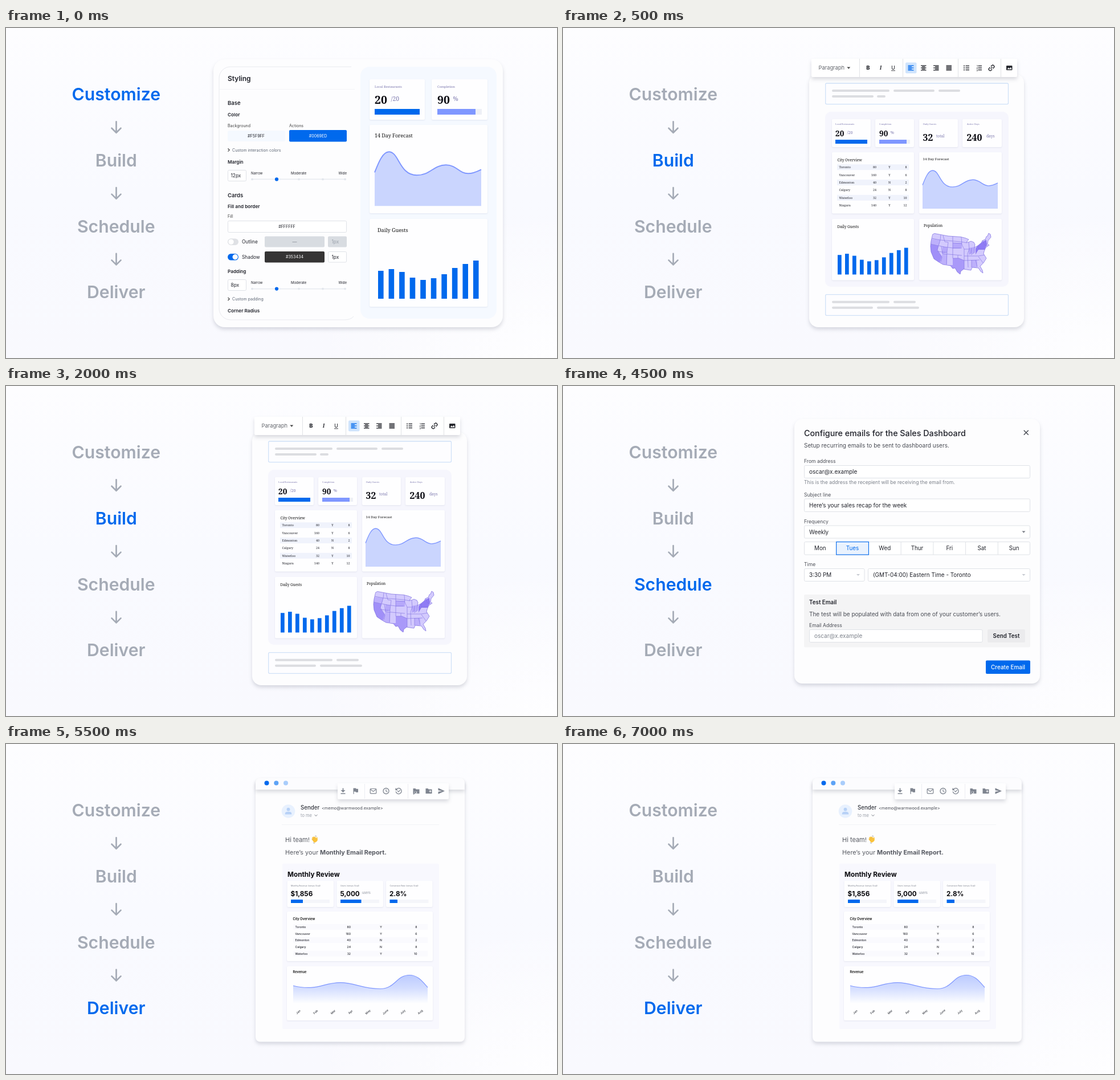
An HTML page for the animation above (8 s loop, 967 by 579 pixels).

```html
<!DOCTYPE html>
<html lang="en">
<head>
<meta charset="utf-8">
<title>Report workflow</title>
<style>
  html, body { margin: 0; width: 100%; height: 100%; overflow: hidden; background: #fbfbff; }
  svg { display: block; width: 967px; height: 579px; font-family: Inter, sans-serif; font-optical-sizing: none; }
  .serif { font-family: "Noto Serif", serif; }
  .card { filter: drop-shadow(0 4px 3px rgba(40, 45, 70, .16)); }
  .tile { filter: drop-shadow(0 1px 1px rgba(60, 70, 120, .1)); }
</style>
</head>
<body>
<svg id="stage" viewBox="0 0 967 579" xmlns="http://www.w3.org/2000/svg"></svg>
<script>
const BLUE = '#0069ed', SOFT = '#7f97ff', INK = '#20222a', GREY = '#a5abb6';
const LOOP = 8000, CUTS = [0, 500, 3000, 5500];

// Drawing helpers, each returns SVG markup
const rect = (x, y, x2, y2, fill, r = 0, more = '') =>
  `<rect x="${x}" y="${y}" width="${x2 - x}" height="${y2 - y}" rx="${r}" fill="${fill}" ${more}/>`;
const text = (x, y, s, size, fill = INK, weight = 400, anchor = 'start', more = '') =>
  `<text x="${x}" y="${y}" font-size="${size}" fill="${fill}" font-weight="${weight}" text-anchor="${anchor}" ${more}>${s}</text>`;
const mid = (x, y, s, size, fill, weight) => text(x, y, s, size, fill, weight, 'middle');
const end = (x, y, s, size, fill, weight) => text(x, y, s, size, fill, weight, 'end');
const line = (d, color, w = 1, more = '') =>
  `<path d="${d}" fill="none" stroke="${color}" stroke-width="${w}" ${more}/>`;
const shape = (d, fill, more = '') => `<path d="${d}" fill="${fill}" ${more}/>`;
const dot = (x, y, r, fill, more = '') => `<circle cx="${x}" cy="${y}" r="${r}" fill="${fill}" ${more}/>`;
const group = (more, ...parts) => `<g ${more}>${parts.join('')}</g>`;
const field = (x, y, x2, y2) => rect(x + .5, y + .5, x2 - .5, y2 - .5, '#fff', 2, 'stroke="#dfe2e7"');
const tile = (x, y, x2, y2) => rect(x, y, x2, y2, '#fefeff', 2, 'class="tile"');
const card = (x, y, x2, y2, r) => rect(x, y, x2, y2, '#fdfdfe', r, 'class="card"');
const caret = (x, y, c) => shape(`M${x - 3},${y - 1.5}h6l-3,3.2z`, c);
const round = 'stroke-linecap="round" stroke-linejoin="round"';

function forecast(x, y, s) {
  const top = 'M0,36C5,24 13,0 25,0C43,0 43,41 74,41C98,41 103,23 125,23C144,23 148,38 164,38C173,38 181,34 187,31';
  return group(`transform="translate(${x} ${y}) scale(${s})"`,
    shape(top + 'V95H0Z', '#cad5fe'), line(top, SOFT, 1.9));
}
function bars(x, y, s) {
  const heights = [49, 52, 47, 37, 33, 36, 43, 54, 61, 67];
  return heights.map((h, i) => {
    const left = x + i * 18.55 * s;
    return rect(left, y - h * s, left + 9.6 * s, y, BLUE);
  }).join('');
}

const cities = [['Toronto', 80, 'Y', 8], ['Vancouver', 160, 'Y', 6], ['Edmonton', 40, 'N', 2],
  ['Calgary', 24, 'N', 8], ['Waterloo', 32, 'Y', 10], ['Niagara', 140, 'Y', 12]];
function table(rows, y, step, cols, stripe, size, weight) {
  return rows.map(([city, count, flag, rank], i) => {
    const by = y + i * step;
    return (i % 2 ? '' : rect(stripe[0], by - 7, stripe[1], by + 3, stripe[2])) +
      text(cols[0], by, city, size, INK, weight) + end(cols[1], by, count, size, INK, weight) +
      mid(cols[2], by, flag, size, INK, weight) + end(cols[3], by, rank, size, INK, weight);
  }).join('');
}

// Scene 1: styling panel
function slider(y) {
  return text(430, y - 8.5, 'Narrow', 5.9) + text(500, y - 8.5, 'Moderate', 6) + end(598, y - 8.5, 'Wide', 6) +
    line(`M431,${y}H597`, '#e9ecf1', 1.8) +
    [432, 514, 556, 595].map(x => dot(x, y, 1.9, '#e2e6ec')).join('') + dot(475, y, 3.1, BLUE);
}
const more = (y, s) => line(`M389.5,${y - 5}l2.7,2.6l-2.7,2.6`, '#333', 1.1) + text(397, y, s, 7.05, '#5d6674');
const head = (y, s, size = 8.2) => text(389, y, s, size, INK, 600);
function stat(x, y, s, label, value, unit, gap) {
  return text(x, y, label, 5.65 * s, '#7c78ae') + text(x, y + 28 * s, value, 19.5 * s, '#0b0b12', 600) +
    text(x + gap, y + 22.5 * s, unit, 10.2 * s, '#7c78ae');
}
function styling() {
  return [
    card(364, 55, 872, 525, 20),
    line('M606,68H394a20,20 0 0 0 -20,20V492a20,20 0 0 0 20,20H594q11,0 16,-6', '#e9eaef'),
    line('M375,107.5H612', '#f3f4f7'),
    head(92.5, 'Styling', 12), head(135, 'Base', 9.5), head(154.5, 'Color'),
    text(389, 174, 'Background', 7.05, '#444'), text(497, 174, 'Actions', 7.05, '#444'),
    rect(389, 180, 490, 199, '#f5f9ff', 2), mid(439, 191.6, '#F5F9FF', 7.1),
    rect(497, 179, 598, 199.5, BLUE, 2), mid(547.5, 191.6, '#0069ED', 7.1, '#fff'),
    more(216.5, 'Custom interaction colors'),
    head(237.5, 'Margin'), field(389, 249, 422, 269), text(394.5, 262, '12px', 8.3), slider(265.4),
    head(296.6, 'Cards', 9.5), head(315.8, 'Fill and border'), text(389, 332.6, 'Fill', 7.05, '#444'),
    field(389, 338, 598, 359), mid(493, 350.8, '#FFFFFF', 7.1),
    rect(389, 369.5, 408, 381, '#dfe1e5', 5.8), dot(395, 375.2, 5.2, '#fff', 'stroke="#d5d7db" stroke-width=".7"'),
    text(414, 378.2, 'Outline', 8.3), rect(454, 365.5, 559, 384.5, '#d8dce1', 2), mid(506.5, 377.5, '—', 8, '#777e88'),
    rect(565, 365.5, 598, 384.5, '#d8dce1', 2), text(571.5, 378.2, '1px', 8.3, '#9aa1ab'),
    rect(389, 396, 408, 407.6, BLUE, 5.8), dot(402.2, 401.8, 4.7, '#fff'),
    text(414, 405, 'Shadow', 8.3), rect(454, 392, 559, 411.5, '#353434', 2), mid(506.5, 404.3, '#353434', 7.1, '#fff'),
    field(565, 392, 598, 411.5), text(571.5, 405, '1px', 8.3),
    head(430, 'Padding'), field(389, 441, 422, 461), text(394.5, 454.3, '8px', 8.3), slider(457.6),
    more(477.8, 'Custom padding'), head(498.5, 'Corner Radius'),
    rect(622, 68, 861, 510, '#f5f9ff', 16),
    tile(638, 90, 735, 161), tile(747, 90, 845, 161), tile(638, 170, 845, 325), tile(638, 335, 845, 489),
    group('class="serif"',
      stat(647, 105, 1, 'Local Restaurants', 20, '/20', 28.5), stat(757, 105, 1, 'Completion', 90, '%', 27.5),
      text(647, 191.5, '14 Day Forecast', 8.95, '#111'), text(652, 358, 'Daily Guests', 9.1, '#111')),
    rect(647, 142, 726, 152, BLUE), rect(757, 142, 835, 152, '#eef0f6'), rect(757, 142, 824, 152, SOFT),
    forecast(647, 217.3, 1), bars(653, 475, 1)
  ].join('');
}

// Scene 2: report builder
const rows = (x, y, w) => [0, 1, 2, 3, 4].map(i =>
  line(`M${x},${y - 4 + i * 2}h${w[i % w.length]}`, '#26282e', 1.3)).join('');
function toolbar() {
  const ink = '#26282e';
  const list = x => [-3.5, 0, 3.5].map(d => line(`M${x - 1.5},${70 + d}h6.5`, ink, 1.4)).join('');
  return [
    rect(436, 54, 797, 86, '#fff', 2, 'class="card"'),
    text(448.5, 73.2, 'Paragraph', 9.3, '#63666d'), caret(501.3, 70, '#444'),
    [520, 596, 693, 768].map(x => line(`M${x}.5,54V86`, '#e1e2e6')).join(''),
    mid(535.5, 73.4, 'B', 9.5, ink, 800),
    text(557.5, 73.4, 'I', 9.5, ink, 600, 'middle', 'font-family="Liberation Serif, serif" font-style="italic"'),
    mid(579.5, 72.8, 'U', 8.6, ink, 500), line('M576,74.8h7', ink, .9),
    rect(601, 60.5, 620.5, 79.5, '#cfe4fc', 2),
    group('', rows(605.5, 70, [10, 6.5]).replaceAll(ink, BLUE)),
    [-4, -2, 0, 2, 4].map((d, i) => line(`M${i % 2 ? 630 : 628},${70 + d}h${i % 2 ? 5.5 : 9.5}`, ink, 1.3)).join(''),
    [-4, -2, 0, 2, 4].map((d, i) => line(`M659.5,${70 + d}h${i % 2 ? -6.5 : -9.5}`, ink, 1.3)).join(''),
    rows(672.5, 70, [9.5]),
    list(708), [-3.5, 0, 3.5].map(d => dot(704, 70 + d, 1, ink)).join(''),
    list(730), [1, 2, 3].map(n => mid(726.7, 64.7 + n * 3.6, n, 3.8, ink, 600)).join(''),
    group('transform="rotate(-45 752 70)"', line('M751,67.5h-2.2a2.5,2.5 0 0 0 0,5h2.2M753,67.5h2.2a2.5,2.5 0 0 1 0,5h-2.2M750,70h4', ink, 1.4)),
    rect(778, 66, 788.5, 74, ink, 1), shape('M779.5,72.6l2.4,-3.2l1.8,2l2,-2.6l2,3.8z', '#fff')
  ].join('');
}
const draft = (y, segs) => segs.map(([x, x2]) => line(`M${x + 2},${y}H${x2 - 2}`, '#dcdde1', 4, round)).join('');
const block = (y, a, b) =>
  rect(460.7, y, 781.5, y + 36.6, '#fdfdff', 2, 'stroke="#d0e1f8" stroke-width="1.3"') + draft(y + 13, a) + draft(y + 23, b);

function map() {
  const land = 'M649,362L652,360.5L676,365L698,366.5L706,368.5L712,371L708,376L711,376L716,374L721,376L723,380L722,385L728,382' +
    'L734,377L736,373L741,371L743,366L745,365L747,360L750,362L751,367L746,373L745,379L748,381L742,385L739,392L738,396L743,404' +
    'L738,412L732,418L736,425L737,430L733,427L729,421L718,420L716,425L709,424L703,423L698,427L697,432L692,428L688,421' +
    'L684,422L680,417L667,415L660,411L651,405L646,393L645,383L646,374Z';
  const borders = 'M647,369L662,372L698,375L709,377M645,379L669,384L684,386L698,386M663,363L662,372L659,382L657,389L665,402L663,410' +
    'M667,364L670,375L676,376M676,376L674,392M684,366L684,404M664,383L666,396L700,399M674,392L673,415M657,392L674,394' +
    'M684,377L700,378M699,367L700,380L704,388L704,408M684,404L695,404L704,408L704,423M693,399V404M704,388L713,388' +
    'M704,400L729,400L741,398M704,408L731,407M712,376L713,388L710,396L711,420M717,386L716,396M722,385L722,394L716,398' +
    'M717,407V420M724,407L727,419M729,382V388L724,397M729,388L740,388M736,373L740,381L745,382M741,371L743,380M729,401L737,412';
  return group('clip-path="url(#land)"',
      shape(land, '#d3cafd'),
      shape('M640,378L659,382L657,390L666,403L663,411L640,411Z', '#a08ff8'),
      shape('M684,404H695L704,408V424L697,436L684,424L676,416H684Z', '#a999f9'),
      shape('M666,383L674,385V394L665,396ZM684,377H700V387H684ZM712,386L723,384L722,394L712,398Z', '#b6a8fa'),
      shape('M724,387L728,381L738,374L743,372L744,380L740,389H729L724,396Z', '#8f7cf5'),
      shape('M645,370L662,372L660,381L645,379ZM666,396H674V415H660ZM717,407H727V420H717Z', '#bdb0fb'),
      line(borders, '#8274e2', .65)) +
    line(land, '#8274e2', .8, round) + `<clipPath id="land"><path d="${land}"/></clipPath>`;
}
function builder() {
  const tops = [[472, 540], [548, 616], [625, 693], [701, 770]];
  const big = (x, label, value, unit, gap) => text(x, 170, label, 3.95, '#7c78ae') +
    text(x - .5, 197.5, value, 16, '#0b0b12', 600) + text(x + gap, 191.5, unit, 6.7, '#7c78ae');
  return [
    card(432, 80, 809, 525, 16), toolbar(),
    block(97, [[472, 573], [580, 652], [659, 697]], [[472, 545], [551, 566]]),
    rect(460, 147, 782, 454, '#f6f6fd', 10),
    tops.map(([a, b]) => tile(a, 160, b, 209)).join(''),
    [218, 335].map(y => tile(472, y, 616, y + 107.5) + tile(625, y, 770, y + 107.5)).join(''),
    rect(478, 196, 534, 203, BLUE), rect(555, 196, 609, 203, '#eef0f6'), rect(555, 196, 603, 203, SOFT),
    group('class="serif"',
      stat(478, 170, .7, 'Local Restaurants', 20, '/20', 20.5), stat(555, 170, .7, 'Completion', 90, '%', 19.5),
      big(632, 'Daily Guests', 32, 'total', 23), big(709, 'Active Days', 240, 'days', 34),
      text(481.5, 233.5, 'City Overview', 6.45, '#111', 500), text(631.5, 232.2, '14 Day Forecast', 6.15, '#111', 500),
      text(481.5, 351, 'Daily Guests', 6.4, '#111', 500), text(633, 349, 'Population', 6.4, '#111', 500),
      table(cities, 246.2, 13.4, [484.5, 550, 573, 603.5], [481, 607, '#f0f3fc'], 5.4, 500)),
    forecast(631, 250, .706), bars(482, 432.5, .7), map(),
    block(467.7, [[472, 573], [580, 619]], [[472, 544], [551, 625]])
  ].join('');
}

// Scene 3: email schedule
function schedule() {
  const days = ['Mon', 'Tues', 'Wed', 'Thur', 'Fri', 'Sat', 'Sun'], w = 56.72;
  const label = (x, y, s) => text(x, y, s, 8.6, '#4a4d55');
  const mail = 'oscar@x.example';
  return [
    card(406, 58, 837, 522, 14),
    text(423, 88, 'Configure emails for the Sales Dashboard', 14.3, INK, 500),
    line('M808.8,77.8l8,8m0,-8l-8,8', '#4a4d55', 1.5),
    text(423, 107.5, 'Setup recurring emails to be sent to dashboard users.', 10.05, '#4a4d55'),
    label(423, 135.4, 'From address'), field(423, 139, 820, 162), text(432, 154.2, mail, 10),
    text(423, 172, 'This is the address the recepient will be receiving the email from.', 8.63, '#7d828b'),
    label(423, 194, 'Subject line'), field(423, 197.5, 820, 221),
    text(432, 213, 'Here’s your sales recap for the week', 9.95),
    label(423, 240.6, 'Frequency'), field(423, 244.5, 820, 267.5), text(432, 259.6, 'Weekly', 9.9), caret(808.5, 256, '#777b84'),
    field(423, 273, 820, 296.5),
    days.map((d, i) => (i ? line(`M${423 + i * w},273.5V296`, '#dfe2e7') : '') +
      (i === 1 ? '' : mid(423 + (i + .5) * w, 288.4, d, 9.8))).join(''),
    rect(479.7, 273.5, 536.4, 296, '#e9f2fe', 0, `stroke="${BLUE}" stroke-width="1.1"`), mid(508, 288.4, 'Tues', 9.8, BLUE),
    label(423, 316, 'Time'), field(423, 320, 529.5, 343), text(432, 335, '3:30 PM', 9.9), caret(518, 331.4, '#c5c9d0'),
    field(535, 320, 820, 343), text(544, 335, '(GMT-04:00) Eastern Time - Toronto', 9.9), caret(808.5, 331.4, '#c5c9d0'),
    rect(423, 366, 820, 458.5, '#f4f4f5', 2), text(432, 383, 'Test Email', 9.8, INK, 600),
    text(432, 403.8, 'The test will be populated with data from one of your customer’s users.', 10, '#4a4d55'),
    label(432, 422.8, 'Email Address'), field(432, 427, 736.5, 450), text(441, 442, mail, 10, '#7d828b'),
    rect(745, 427, 811, 450, '#ebebed', 2), mid(778, 442, 'Send Test', 9.75, INK, 600),
    rect(742, 481.5, 820, 505, BLUE, 2), mid(781, 496.8, 'Create Email', 10, '#fff', 500)
  ].join('');
}

// Scene 4: delivered mail
function mailIcons() {
  const c = '#7f8590';
  const folder = x => shape(`M${x - 5.5},78h4l1.2,1.5h5.8v7.5h-11z`, c);
  return [
    rect(582, 69, 777, 97, '#fefeff', 2, 'class="card"'),
    [629, 705].map(x => line(`M${x}.5,70V96`, '#eceef2')).join(''),
    line('M591.5,77.5v5M587.5,87h8', c, 1.7), shape('M587.5,81h8l-4,4z', c),
    shape('M609.5,77.5h4.5l.7,1.2h3.3v6h-4l-.7,-1.2h-2.6v4.2h-1.2z', c),
    rect(639.2, 78.5, 649.8, 86.8, 'none', 1, `stroke="${c}" stroke-width="1.2"`), line('M639.5,79.5l5,3.7l5,-3.7', c, 1.2),
    dot(667, 82.5, 5, 'none', `stroke="${c}" stroke-width="1.3"`), line('M667,79.5v3.2l2.4,1.6', c, 1.2),
    line('M684.8,80a5,5 0 1 1 -.6,3.4M684,77.5v3h3', c, 1.3), line('M687,82.3l1.8,1.7l3.2,-3.3', c, 1.2),
    folder(720), line('M716,88.5l4,-4m-3.5,0h3.5v3.5', '#fff', 2.2), line('M715,88.5l4.5,-4.5m-3,0h3v3', c, 1.2),
    folder(742), line('M744.5,81v4m-2,-2h4', '#fff', 1),
    shape('M758.5,77.3l11.5,5.2l-11.5,5.2v-4l7,-1.2l-7,-1.2z', c)
  ].join('');
}
function wave() {
  const skin = '#f9c23c';
  return group('transform="translate(541.5 167.5) rotate(-35)"',
    [-2.9, -1, .9, 2.8].map((x, i) => line(`M${x},1V${[-3, -4.6, -4.4, -3][i]}`, skin, 1.9, round)).join(''),
    rect(-3.8, -1, 3.8, 5, skin, 2.6), line('M3.2,3L5.2,-.2', skin, 1.9, round),
    line('M-1.9,-1V-3.2M0,-1V-3.6M1.9,-1V-3.2', '#d99a25', .4),
    line('M4.2,-4.6q1.6,.8 1.9,2.4M-5.2,3q.2,1.8 1.6,2.8', '#8d939e', .8));
}
function deliver() {
  const top = 'M504,424C514,427 524,427.7 535,427.4C555,426 565,418.6 587,418.6C612,418.6 625,429.5 657,429.5C683,429.5 685,405.5 708,405.5C723,405.5 731,417 740,427';
  const months = ['Jan', 'Feb', 'Mar', 'Apr', 'May', 'June', 'July', 'Aug'];
  const kpi = (x, name, value, w) => tile(x - 6.5, 240, x + 75, 286) + text(x, 250, `${name} (versus Goal)`, 3.5, '#777c88') +
    text(x - .5, 266.5, value, 11.7, '#08080c', 700) + rect(x, 273, x + 68, 279, '#f5f6fa') + rect(x, 273, x + w, 279, BLUE, .6);
  return [
    card(438, 60, 805, 522.5, 8),
    shape('M438,80V68a8,8 0 0 1 8,-8H797a8,8 0 0 1 8,8V80Z', '#fcfcfe', 'class="card"'),
    dot(457.5, 68.5, 4, BLUE), dot(474.3, 68.5, 4, '#5da3f6'), dot(491, 68.5, 4, '#a9cdfb'),
    mailIcons(),
    dot(495.5, 118, 11.8, '#e8f1fe'), dot(495.5, 114.7, 2.9, '#b7d1f6'), shape('M489.8,123.6v-1.6q0,-3.2 5.7,-3.2t5.7,3.2v1.6z', '#b7d1f6'),
    text(517, 115.4, 'Sender', 9.7, '#33363e', 500), text(554, 114.6, '&lt;memo@warmwood.example&gt;', 7.3, '#4a4d55'),
    text(517, 127.7, 'to me', 7.5, '#9a9fa9'), line('M541.5,124l2.5,2.4l2.5,-2.4', '#777c86', 1),
    line('M484,141.5H760', '#f2f3f6'),
    text(490, 171.6, 'Hi team!', 11, '#575a62'), wave(),
    text(490, 193.8, 'Here’s your <tspan font-weight="700">Monthly Email Report.</tspan>', 10.85, '#575a62'),
    rect(485, 210, 760, 500, '#f8f8fe', 2), text(494, 233, 'Monthly Review', 11.75, '#08080c', 700),
    kpi(500, 'Monthly Revenue', '$1,856', 21), kpi(587, 'Users', '5,000', 36.5), kpi(673.5, 'Conversion Rate', '2.8%', 13.5),
    text(625, 262.6, 'users', 5.7, '#8a8f9a'),
    tile(493, 294, 749, 381), text(503.5, 308.6, 'City Overview', 5.7, '#111', 600),
    table(cities.slice(0, 5), 322.8, 11.75, [507.5, 605, 658, 721.5], [504, 740, '#fafafe'], 5.1, 500),
    tile(493, 390, 749, 485), text(503.5, 402, 'Revenue', 5.7, '#111', 600),
    shape(top + 'V456H504Z', 'url(#fade)'), line(top, SOFT, 1.2),
    months.map((m, i) => text(0, 0, m, 5, '#33363e', 500, 'middle',
      `transform="translate(${514 + i * 30.6} 471.5) rotate(-42)"`)).join('')
  ].join('');
}

const steps = ['Customize', 'Build', 'Schedule', 'Deliver'];
const scenes = [styling, builder, schedule, deliver];
document.getElementById('stage').innerHTML = `
  <defs>
    <linearGradient id="sky" x1="0" y1="0" x2="0" y2="1">
      <stop offset="0" stop-color="#fdfdff"/><stop offset=".5" stop-color="#f9faff"/><stop offset="1" stop-color="#f9f9fe"/>
    </linearGradient>
    <radialGradient id="glow" cx="1" cy="1" r=".45">
      <stop offset="0" stop-color="#fefeff"/><stop offset="1" stop-color="#fefeff" stop-opacity="0"/>
    </radialGradient>
    <linearGradient id="fade" x1="0" y1="0" x2="0" y2="1">
      <stop offset="0" stop-color="#bccbff"/><stop offset=".45" stop-color="#d3ddff"/><stop offset="1" stop-color="#fff"/>
    </linearGradient>
  </defs>` +
  rect(0, 0, 967, 579, 'url(#sky)') + rect(0, 0, 967, 579, 'url(#glow)') +
  steps.map((s, i) => text(193.3, 127 + i * 115.8, s, 30.2, GREY, 600, 'middle', 'class="step"')).join('') +
  [174.3, 290.1, 405.9].map(y => line(`M193.5,${y - 10}v19.5m-8,-8l8,8l8,-8`, GREY, 2.7, round)).join('') +
  scenes.map(draw => group('class="scene" opacity="0"', draw())).join('');

// Hold one value while step i is current, another one otherwise
function hold(el, prop, i, on, off) {
  const frames = CUTS.map((t, k) => ({ offset: t / LOOP, [prop]: k === i ? on : off, easing: 'step-end' }));
  frames.push({ offset: 1, [prop]: i === CUTS.length - 1 ? on : off });
  el.animate(frames, { duration: LOOP, iterations: Infinity });
}
document.querySelectorAll('.scene').forEach((el, i) => hold(el, 'opacity', i, 1, 0));
document.querySelectorAll('.step').forEach((el, i) => hold(el, 'fill', i, BLUE, GREY));
</script>
</body>
</html>
```
